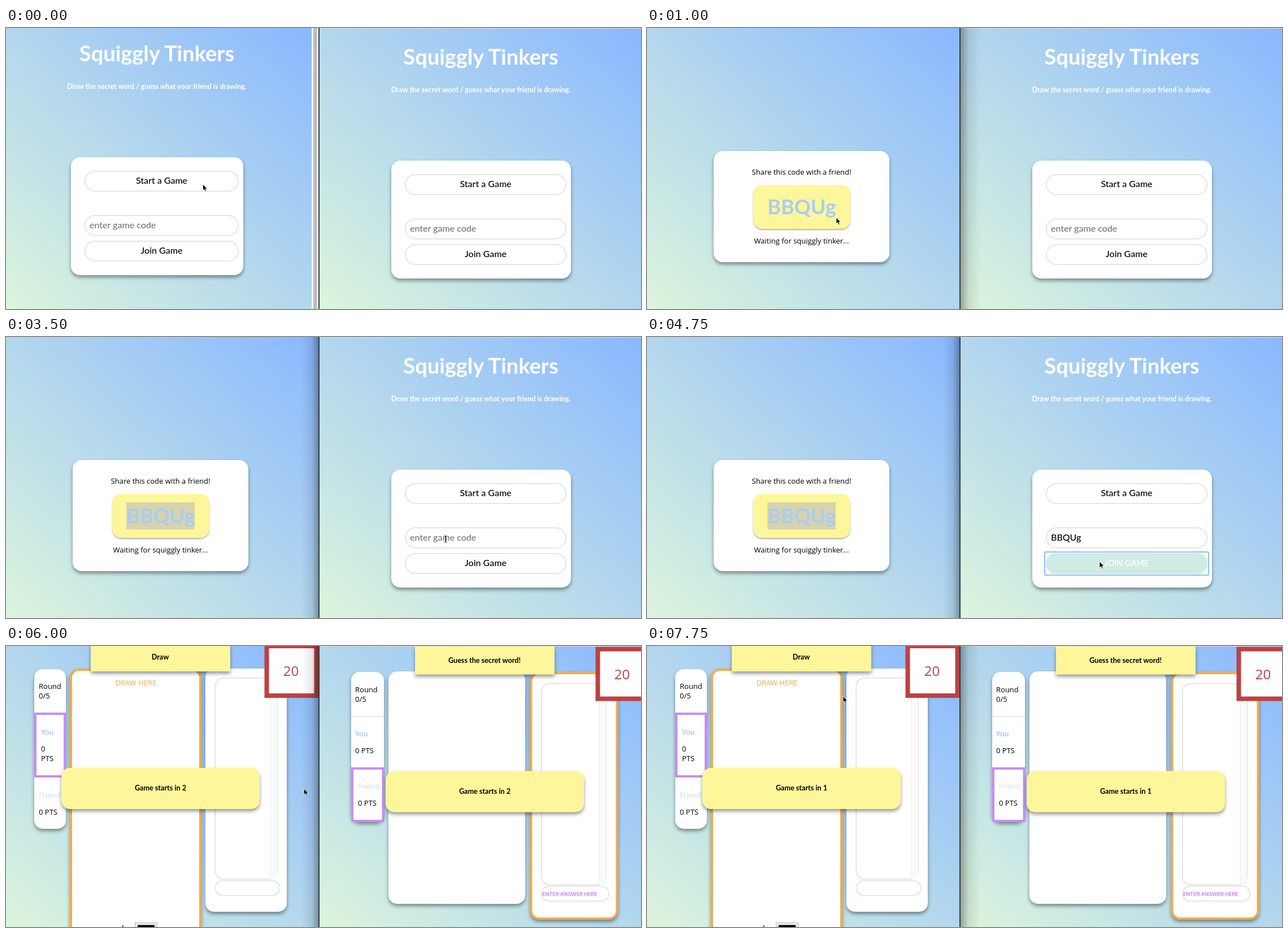
An HTML page for the animation above (8000 ms loop, 1124x498 px).

```html
<!DOCTYPE html>
<html lang="en">
<head>
<meta charset="utf-8">
<title>Drawing game</title>
<style>
  html, body { margin: 0; width: 100%; height: 100%; overflow: hidden; }
  svg { display: block; }
  text { font: 13px "Open Sans", sans-serif; white-space: pre; }
  .mid { text-anchor: middle; }
  .title { font: 700 38px Lato, sans-serif; fill: #fff; }
  .sub { font: 700 12.4px Lato, sans-serif; fill: #fff; }
  .ui { font: 500 16px Lato, sans-serif; }
  .hot { font: 500 14.5px Lato, sans-serif; fill: #fff; }
  .note { font: 700 12.6px Lato, sans-serif; }
  .code { font: 700 36px Lato, sans-serif; fill: #a8cdf5; }
  .time { font-size: 24px; fill: #bd4040; }
  .hint { font: 700 9px Inter, sans-serif; fill: #c98bf9; }
  .grey { fill: #757575; }
  .you { fill: #7fb3f6; }
  .friend { fill: #bde3ea; }
  .orange { fill: #f3a947; }
  .lift { filter: drop-shadow(0 4px 3px rgba(0, 0, 0, .4)); }
  .low { filter: drop-shadow(0 2px 1px rgba(0, 0, 0, .3)); }
</style>
</head>
<body>
<svg width="1124" height="498" viewBox="0 0 1124 498">
  <defs>
    <linearGradient id="sky" x1="0" y1="1" x2="1" y2="0">
      <stop stop-color="#dcf5dc"/><stop offset="1" stop-color="#89b8ff"/>
    </linearGradient>
    <linearGradient id="shadeR">
      <stop stop-opacity=".32"/><stop offset=".4" stop-opacity=".09"/><stop offset="1" stop-opacity="0"/>
    </linearGradient>
    <linearGradient id="shadeL">
      <stop stop-opacity="0"/><stop offset=".6" stop-opacity=".09"/><stop offset="1" stop-opacity=".32"/>
    </linearGradient>
  </defs>
  <g id="stage"></g>
</svg>
<script>
const stage = document.getElementById('stage');
const LOOP = 8000, STEP = 250;
const YELLOW = '#fef69a', ORANGE = '#f6ab4a', PURPLE = '#c98bf9', LINE = '#dedede';

// Pointer path: time, x, y; linear between neighbours.
const PATH = [
  [0, 348.5, 277], [500, 348.5, 277], [1000, 335, 336], [1250, 322, 322], [2500, 322, 322],
  [2750, 833, 386], [3500, 778, 358], [4000, 778, 358], [4500, 801, 398], [5250, 801, 398],
  [6500, 345, 156], [6750, 338, 109], [7750, 347, 89]
];

const rect = (x, y, w, h, fill, r = 0, more = '') =>
  `<rect x="${x}" y="${y}" width="${w}" height="${h}" rx="${r}" fill="${fill}" ${more}/>`;
const text = (x, y, str, cls = '') => `<text x="${x}" y="${y}" class="${cls}">${str}</text>`;
const mid = (x, y, str, cls = '') => text(x, y, str, 'mid ' + cls);
const panel = (x, y, w, h, fill = '#fff', r = 16, cls = 'lift') =>
  rect(x, y, w, h, fill, r, `class="${cls}"`);
// Outlined box measured to its outer edge.
const frame = (x, y, w, h, color, b, r = 0, fill = '#fff', more = '') =>
  rect(x + b / 2, y + b / 2, w - b, h - b, fill, r, `stroke="${color}" stroke-width="${b}" ${more}`);
const field = (x, y, w, h = 37) => frame(x, y, w, h, LINE, 1.5, h / 2);
const sky = (x, w) => rect(x, 0, w, 498, 'url(#sky)');

function home(cx, x, w, dy, { hotStart, hotJoin, focus, code } = {}) {
  const fx = x + 24, fw = w - 32, mx = fx + fw / 2;
  const button = (y, label, hot) => hot
    ? rect(fx, y, fw, 37, '#d0ebe4', 18) + mid(mx, y + 23, label.toUpperCase(), 'hot')
    : field(fx, y, fw) + mid(mx, y + 23, label, 'ui');
  return `<g transform="translate(0 ${dy})">` +
    mid(cx, 59, 'Squiggly Tinkers', 'title') +
    mid(cx, 108, 'Draw the secret word / guess what your friend is drawing.', 'sub') +
    panel(x, 229, w, 209) +
    button(253, 'Start a Game', hotStart) +
    field(fx, 331.5, fw) +
    text(fx + 9, 354.5, code || 'enter game code', code ? 'ui' : 'ui grey') +
    button(377, 'Join Game', hotJoin) +
    (focus ? frame(fx - 3, 374, fw + 6, 43, '#8fbdfb', 2, 1, 'none') : '') + '</g>';
}

function share(selection) {
  return panel(118, 218, 311, 197) +
    mid(273.5, 260, 'Share this code with a friend!') +
    panel(188, 278, 172, 78, YELLOW, 16, 'low') +
    (selection ? rect(213, 293, 121, 48, selection) : '') +
    mid(274, 330, 'BBQUg', 'code') +
    mid(273.5, 382, 'Waiting for squiggly tinker...');
}

function chat(x, y, w, inputW) {
  return frame(x, y, w, 358, LINE, 1.5, 15) +
    rect(x + w - 13, y + 20, 12, 337, '#fafafa') +
    rect(x + w - 13.5, y + 20, 1, 337, '#ececec') +
    field(x, y + 359, inputW, 28);
}

// Parts both players see in the same place of their window.
function overlay(dx, dy, title, count, timerX) {
  return `<g transform="translate(${dx} ${dy})">` +
    panel(150, -5, 247, 50, YELLOW, 0) + mid(273, 24, title, 'note') +
    panel(98, 216, 351, 73, YELLOW, 15) + mid(273.5, 256, 'Game starts in ' + count, 'note') +
    frame(timerX, -4, 96, 96, '#bd4242', 8) + mid(timerX + 47, 53, '20', 'time') + '</g>';
}

function drawer(count) {
  return panel(50, 41, 56, 283, '#fff', 15) +
    text(58, 76, 'Round') + text(58, 93, '0/5') +
    frame(50, 118, 56, 115, PURPLE, 4) +
    text(62, 157, 'You', 'you') + text(62, 187, '0') + text(62, 204, 'PTS') +
    text(58, 269, 'Friend', 'friend') + text(58, 299, '0 PTS') +
    frame(113, 40, 233, 500, ORANGE, 4, 14, '#fff', 'class="lift"') +
    mid(230, 70, 'DRAW HERE', 'orange') +
    rect(206, 495, 1.5, 3, '#222') +
    frame(228, 490, 40, 20, '#bbb', 1, 0, '#eee') + rect(233, 494.5, 30, 10, '#000') +
    panel(353, 40, 144, 431, '#fff', 15) + chat(369.5, 56, 111.5, 116) +
    overlay(0, 0, 'Draw', count, 457.5);
}

function guesser(count) {
  return panel(611, 46, 58, 266, '#fff', 15) +
    text(618, 81.5, 'Round') + text(618, 99, '0/5') + rect(611, 124, 58, 1, '#d5d5d5') +
    text(618, 160, 'You', 'you') + text(618, 190, '0 PTS') +
    frame(611, 215, 58.5, 97, PURPLE, 4) +
    text(623, 253, 'Friend', 'friend') + text(623, 283, '0 PTS') +
    panel(677, 45, 242, 412, '#fff', 15) +
    frame(927.5, 46, 156, 439, ORANGE, 4, 14, '#fff', 'class="lift"') +
    chat(947, 66, 116, 121) + text(949, 443, 'ENTER ANSWER HERE', 'hint') +
    overlay(574, 5.5, 'Guess the secret word!', count, 469.5);
}

function pointer(t) {
  const i = Math.max(1, PATH.findIndex(p => p[0] >= t));
  const [t0, x0, y0] = PATH[i - 1], [t1, x1, y1] = PATH[i];
  const k = (t - t0) / (t1 - t0);
  const at = `transform="translate(${x0 + (x1 - x0) * k} ${y0 + (y1 - y0) * k})"`;
  const overText = t >= 1250 && t < 2750 || t >= 3250 && t <= 4000;
  return overText
    ? `<path ${at} d="M-2.5-6Q0-6 0-4V4Q0 6-2.5 6M2.5-6Q0-6 0-4V4Q0 6 2.5 6" fill="none" stroke="#222"/>`
    : `<path ${at} d="M0 0V11L2.6 8.7 4.4 12.7 6.2 11.9 4.5 8.1H7.8Z" stroke="#fff" stroke-width=".8"/>`;
}

function draw(t) {
  const playing = t >= 5000;
  const count = 3 - (t >= 6000) - (t >= 7000);
  const rightActive = t >= 3250 && t < 7250;
  const narrow = t < 500;
  const selection = t < 1750 ? '' : rightActive ? '#d7d3ac' : '#b3d4d5';

  const left = playing ? drawer(count)
    : narrow ? home(267, 115, 305, 0, { hotStart: t >= 250 })
    : share(selection);
  const right = playing ? guesser(count)
    : home(840.5, 682, 318, 6, {
        code: t >= 4000 && 'BBQUg', hotJoin: t >= 4500, focus: t >= 4750
      });

  stage.innerHTML =
    sky(0, narrow ? 541 : 553) + left +
    (narrow ? rect(541, 0, 12, 498, '#f4f4f4') + rect(544, 0, 6.5, 498, '#bcbcbc') : '') +
    (rightActive ? rect(523, 0, 30, 498, 'url(#shadeL)') : '') +
    sky(555, 569) + rect(555, 0, 569, 1, '#dcdfe2') + right +
    (!rightActive && t > 0 ? rect(555, 0, 36, 498, 'url(#shadeR)') : '') +
    rect(553, 0, 2, 498, '#363b42') +
    pointer(t);
}

let shown = -1;
function tick() {
  const t = Math.floor(performance.now() % LOOP / STEP) * STEP;
  if (t !== shown) draw(shown = t);
  requestAnimationFrame(tick);
}
tick();
</script>
</body>
</html>
```
